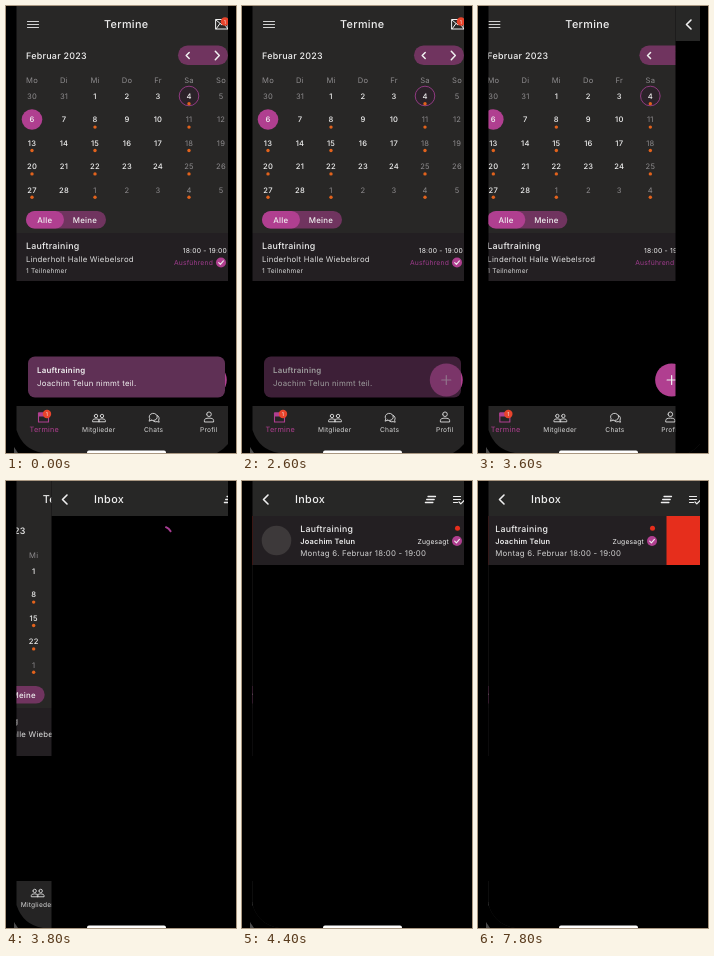
Animation, 230 px wide and 447 px high, one loop 8 s. Source, as an HTML page:

```html
<!DOCTYPE html>
<html lang="de">
<head>
<meta charset="utf-8">
<title>Termine</title>
<style>
html, body { margin: 0; width: 100%; height: 100%; overflow: hidden; background: #000; }
svg { display: block; width: 230px; height: 447px; }
text { font-family: Inter, "Open Sans", sans-serif; white-space: pre; letter-spacing: .03em; text-rendering: geometricPrecision; }
.line { fill: none; stroke: #f0f0f0; stroke-width: 1; stroke-linecap: round; stroke-linejoin: round; }
</style>
</head>
<body>
<svg viewBox="0 0 230 447">
  <defs>
    <clipPath id="screen"><path d="M10.5 0H222V438Q218 443 211 447H37Q17 444 10.5 424Z"/></clipPath>
  </defs>
  <rect width="230" height="447" fill="#000"/>
  <path d="M8 441L12 447H8Z" fill="#4a4a4a"/>
  <g clip-path="url(#screen)">
    <g id="calendar"></g>
    <g id="inbox"></g>
  </g>
  <rect x="81" y="444.5" width="79" height="4" rx="2" fill="#fff"/>
</svg>
<script>
const LOOP = 8000, STEP = 200, PAGE = 219;
const WHITE = '#f0f0f0', GREY = '#8d8b8d', PINK = '#b03f90', PLUM = '#70345f',
      PANEL = '#282726', ROW = '#231f22', RED = '#e62e1c', ORANGE = '#e2621c';
const $ = id => document.getElementById(id);

const text = (x, y, size, str, fill = WHITE, weight = 400, anchor = 'start') =>
  `<text x="${x}" y="${y}" font-size="${size * .95}" fill="${fill}" font-weight="${weight}" text-anchor="${anchor}">${str}</text>`;
const mid = (x, y, size, str, fill, weight) => text(x, y, size, str, fill, weight, 'middle');
const rect = (x, y, w, h, fill, r = 0) =>
  `<rect x="${x}" y="${y}" width="${w}" height="${h}" rx="${r}" fill="${fill}"/>`;
const dot = (x, y, r, fill, extra = '') => `<circle cx="${x}" cy="${y}" r="${r}" fill="${fill}" ${extra}/>`;
const line = (d, width = 1, color = '#f0f0f0') =>
  `<path class="line" d="${d}" style="stroke:${color};stroke-width:${width}"/>`;
const check = (x, y) => dot(x, y, 5, PINK) + line(`M${x - 2.3} ${y + .2}l1.7 1.7 3-3.6`, 1.1);
const badge = (x, y, r) => dot(x, y, r, '#e8442c') + mid(x, y + 2, 5.5, '1');

function monthGrid() {
  const cols = [26, 58, 89, 121, 152, 183, 215];
  const events = [5, 9, 12, 14, 16, 19, 21, 23, 26, 28, 30, 33];
  let out = ['Mo', 'Di', 'Mi', 'Do', 'Fr', 'Sa', 'So'].map((d, i) => mid(cols[i], 76.5, 8, d, GREY)).join('');
  out += dot(26, 113.5, 10.3, PINK);
  out += dot(183, 90, 9.8, '#2b2229', 'stroke="#8f3a80" stroke-width="1"');
  for (let i = 0; i < 35; i++) {
    const col = i % 7, y = 90 + Math.floor(i / 7) * 23.4;
    const feb = i > 1 && i < 30;
    const label = feb ? i - 1 : i < 2 ? i + 30 : i - 29;
    const bright = feb && (col < 5 || i === 5);
    out += mid(cols[col], y + 3, 8, label, bright ? WHITE : GREY, bright ? 500 : 400);
    if (events.includes(i)) out += dot(cols[col], y + 7.7, 1.7, ORANGE);
  }
  return out;
}

function tabBar() {
  const person = (x, y, s) =>
    line(`M${x - 2 * s} ${y - 2.4 * s}a${2 * s} ${2 * s} 0 1 0 ${4 * s} 0a${2 * s} ${2 * s} 0 1 0 ${-4 * s} 0` +
         `M${x - 4 * s} ${y + 4 * s}v${-s}q0 ${-2 * s} ${4 * s} ${-2 * s}t${4 * s} ${2 * s}v${s}z`, .9, '#dedede');
  return rect(0, 400, 260, 47, '#252424') +
    line('M32.5 407h10v9h-10z', 1.1, PINK) + rect(32, 406.5, 11, 4, PINK, 1) + badge(41, 408, 4.2) +
    person(90, 412, .85) + person(96, 412, .85) +
    line('M145.5 414.2l-2.4 1 .7-2.4a4 3.6 0 1 1 1.7 1.4M151 409.2a3.4 3.4 0 0 1 1.6 5l.6 2-2.1-.6a4 4 0 0 1-3.6-.4', .9, '#dedede') +
    person(203, 411, 1.15) +
    mid(38.3, 426, 7.7, 'Termine', PINK) + mid(92.7, 426, 7, 'Mitglieder', '#d5d5d5') +
    mid(147.6, 426, 7, 'Chats', '#d5d5d5') + mid(202.7, 426, 7, 'Profil', '#d5d5d5');
}

$('calendar').innerHTML =
  rect(0, 0, 260, 227, PANEL) +
  line('M21.5 15.5h11M21.5 18.5h11M21.5 21.5h11', 1.2, '#d2d2d2') +
  text(98, 22.3, 11.4, 'Termine', WHITE, 500) +
  line('M210 13.5h12v9.5h-12zM210 14l6 5 6-5M210 23l4-5.5M222 23l-4-5.5') + badge(219, 15.5, 4.3) +
  text(20, 53, 9.4, 'Februar 2023', WHITE, 500) +
  rect(172, 39.5, 50, 19.5, PLUM, 9.7) +
  line('M183.2 46.5l-3 3 3 3', 1.5) + line('M209.3 45.3l4 4.2-4 4.2', 1.5) +
  monthGrid() +
  rect(20, 205, 80, 17.5, PLUM, 8.7) + rect(20, 205, 38, 17.5, PINK, 8.7) +
  mid(38.7, 216.8, 8.3, 'Alle', WHITE, 500) + mid(79, 216.8, 8.3, 'Meine', WHITE, 500) +
  rect(0, 227, 260, 48, ROW) +
  text(20, 243.3, 9.3, 'Lauftraining', WHITE, 500) +
  text(20, 256, 8.2, 'Linderholt Halle Wiebelsrod', '#dcdcdc') +
  text(20, 266.8, 6.9, '1 Teilnehmer', '#d5d5d5') +
  text(221, 247, 7.1, '18:00 - 19:00', WHITE, 400, 'end') +
  text(207, 259, 7.1, 'Ausführend', '#a03b8e', 400, 'end') + check(215, 256.5) +
  dot(204.3, 374, 16.5, PINK) + line('M199.8 374h9M204.3 369.5v9', 1.2) +
  `<g id="toast">${rect(22, 350.5, 197, 41, '#5f3055', 7)}` +
  text(31, 367, 8.3, 'Lauftraining', WHITE, 600) +
  text(31, 379.7, 8.2, 'Joachim Telun nimmt teil.') + '</g>' +
  tabBar();

$('inbox').innerHTML =
  rect(10.5, 0, PAGE, 447, '#000') + rect(10.5, 0, PAGE, 35, '#272726') +
  line('M26 14l-4.5 4.5 4.5 4.5', 1.6) +
  text(53, 22.3, 11.4, 'Inbox', WHITE, 500) +
  line('M186 15.5h7.5M184.7 18.5h7.5M183.4 21.5h7.5', 1.3) +
  line('M211.5 15.5h7M211.5 18.5h7M211.5 21.5h4M217 21l1.8 1.8 4-4', 1.2) +
  `<path id="spinner" class="line" d="M125 46.2a10 10 0 0 1 4.6 4" style="stroke:#a63c92;stroke-width:2"/>` +
  `<g id="list">${rect(10.5, 35, PAGE, 49, RED)}<g id="row">` +
  rect(10.5, 35, PAGE, 49, ROW) + dot(34.5, 59.5, 14.8, '#3d393a') +
  text(58.3, 50.7, 9.2, 'Lauftraining', WHITE, 500) +
  text(58.3, 62.7, 7.8, 'Joachim Telun', WHITE, 600) +
  text(58.3, 75, 8.25, 'Montag 6. Februar 18:00 - 19:00', '#cfcfcf') +
  text(207, 62.5, 7.1, 'Zugesagt', WHITE, 400, 'end') +
  dot(215.5, 47.3, 2.5, RED) + check(215, 60) + '</g></g>';

// [start ms, value]; each value holds until the next entry
const steps = {
  toast: [[0, 1], [2600, .65], [2800, 0]],
  page: [[0, PAGE], [3600, 187], [3800, 35], [4000, 3], [4200, 0]],
  swipe: [[0, 0], [7600, -13], [7800, -41]],
  spin: [[0, 0], [4000, 110]]
};
const at = (name, t) => steps[name].filter(s => s[0] <= t).pop()[1];
const shift = (id, x) => $(id).setAttribute('transform', `translate(${x} 0)`);

function draw(now) {
  const t = Math.floor(now % LOOP / STEP) * STEP;
  const x = at('page', t);
  shift('calendar', (x - PAGE) / 3);
  shift('inbox', x);
  shift('row', at('swipe', t));
  $('toast').setAttribute('opacity', at('toast', t));
  $('spinner').setAttribute('transform', `rotate(${at('spin', t)} 120.5 55)`);
  $('list').setAttribute('visibility', t >= 4200 ? 'visible' : 'hidden');
}

const start = performance.now();
function tick() {
  draw(performance.now() - start);
  requestAnimationFrame(tick);
}
tick();
</script>
</body>
</html>
```
